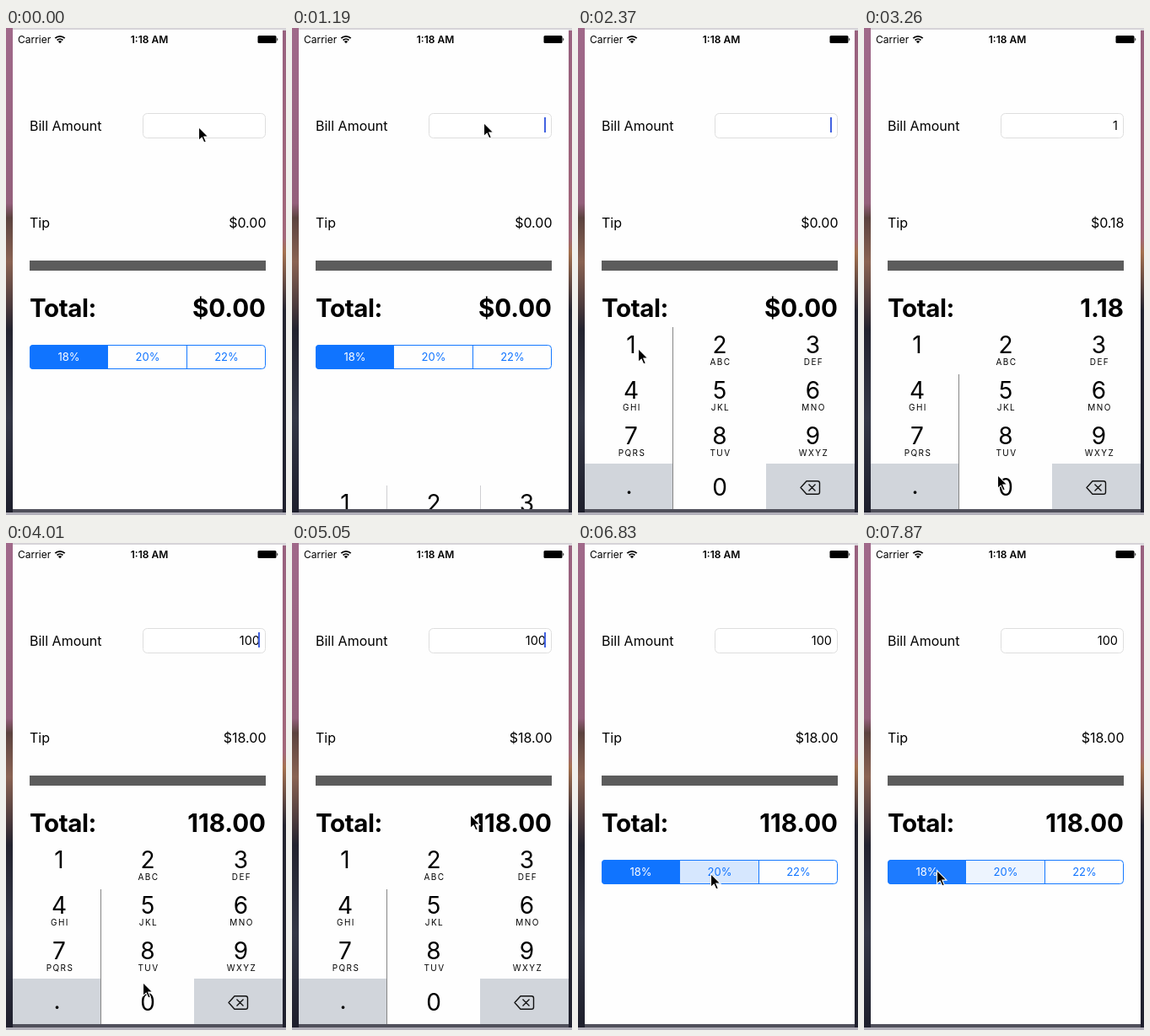
An HTML page that plays this animation: 332 px wide and 578 px high, repeating every 8000 ms.

```html
<!DOCTYPE html>
<html lang="en">
<head>
<meta charset="utf-8">
<title>Tip calculator</title>
<style>
html, body { margin: 0; width: 100%; height: 100%; overflow: hidden; }
svg { display: block; width: 332px; height: 578px; font: 16px Inter, Roboto, sans-serif; }
.end { text-anchor: end; }
.mid { text-anchor: middle; }
.big { font-size: 29.5px; font-weight: 700; }
.seg { font-size: 13px; }
.key { font-size: 28px; }
.abc { font-size: 10px; letter-spacing: 1.4px; }
</style>
</head>
<body>
<svg viewBox="0 0 332 578">
  <defs>
    <linearGradient id="left" x2="0" y2="1">
      <stop offset="0" stop-color="#a0698a"/><stop offset=".36" stop-color="#94607c"/>
      <stop offset=".39" stop-color="#5c433f"/><stop offset=".48" stop-color="#8a6353"/>
      <stop offset=".57" stop-color="#4c3b3d"/><stop offset=".62" stop-color="#23232f"/>
      <stop offset=".8" stop-color="#343746"/><stop offset="1" stop-color="#1d1e2b"/>
    </linearGradient>
    <linearGradient id="right" x2="0" y2="1">
      <stop offset="0" stop-color="#98617f"/><stop offset=".43" stop-color="#a3677a"/>
      <stop offset=".46" stop-color="#a5714f"/><stop offset=".53" stop-color="#5b4440"/>
      <stop offset=".58" stop-color="#23232f"/><stop offset="1" stop-color="#20212e"/>
    </linearGradient>
    <clipPath id="screen"><path d="M8 3H328V571H8Z"/></clipPath>
    <clipPath id="pill"><rect x="28" y="376" width="280" height="29" rx="4"/></clipPath>
  </defs>
  <path fill="url(#left)" d="M0 0H8V578H0Z"/>
  <path fill="url(#right)" d="M328 0H332V578H328Z"/>
  <path fill="#50505b" d="M8 571H328V575H8Z"/>
  <path fill="#b2b0ba" d="M0 575H332V578H0Z"/>
  <path fill="#d6d3d8" d="M8 0H332V3H8Z"/>
  <path fill="#fefefe" d="M8 2H328V571H8Z"/>

  <text x="14" y="17.5" font-size="12">Carrier</text>
  <text x="170" y="17.5" font-size="12" font-weight="600" class="mid">1:18 AM</text>
  <g fill="none" stroke="#000" stroke-width="1.8">
    <path d="M58.3 12.2A8.2 8.2 0 0 1 69.7 12.2M60.6 14.5A5 5 0 0 1 67.4 14.5"/>
    <path fill="#000" stroke="none" d="M64 18.3L61.9 16.1A3 3 0 0 1 66.1 16.1Z"/>
  </g>
  <rect x="298.5" y="9" width="22" height="9" rx="1.5"/>
  <path d="M321.3 11.5Q323.3 13.5 321.3 15.5Z"/>

  <text x="28" y="121.5">Bill Amount</text>
  <rect x="162.5" y="101.5" width="145" height="29" rx="5" fill="#fff" stroke="#dedede"/>
  <text id="bill" class="end" x="301" y="121" font-size="14.5"/>
  <path id="caret" fill="#4262e0" d="M299 106H301V124H299Z"/>
  <text x="28" y="237.3">Tip</text>
  <text id="tip" class="end" x="308.5" y="237.3"/>
  <path fill="#5c5c5c" d="M28 276H308V288H28Z"/>
  <text class="big" x="28" y="342.5" letter-spacing="-.4">Total:</text>
  <text id="total" class="big end" x="308" y="342.5"/>

  <g id="segs" clip-path="url(#pill)"></g>
  <g fill="none" stroke="#1478ff">
    <rect x="28.5" y="376.5" width="279" height="28" rx="4"/>
    <path d="M120.5 376V405M214.5 376V405"/>
  </g>
  <g clip-path="url(#screen)"><g id="pad"></g></g>
  <path id="arrow" stroke="#fff" stroke-width="1.1" d="M0 0V16L3.7 12.6 6.3 18.4 8.8 17.3 6.3 11.6H11.4Z"/>
</svg>
<script>
const $ = id => document.getElementById(id);
const LOOP = 8000, STEP = 148.4, BLUE = '#1074ff', GREY = '#d1d5db';
const PAD_HEIGHT = 216, ROW = 54, TOP = 355;

// Tracks are lists of [time, value, ...].
const cursor = [[0, 228, 117], [450, 228, 116], [1040, 227, 112], [1640, 227, 112], [2220, 85, 366],
  [2370, 71, 380], [2820, 71, 382], [3260, 158, 530], [3860, 146, 531], [4010, 162, 521],
  [4460, 212, 384], [4900, 212, 384], [5050, 211, 320], [5200, 210, 258], [5340, 210, 229],
  [5790, 210, 229], [6530, 159, 388], [6830, 157, 392], [7130, 157, 392], [7570, 87, 389], [7870, 86, 388]];
const slide = [[1040, 216], [1190, 187], [1340, 62], [1490, 12], [1640, 0],
  [5490, 0], [5640, 24], [5790, 139], [5940, 192], [6090, 210], [6240, 216]];
const fills = [
  [[6830, 1], [6980, 0], [7420, 0], [7570, .17], [7720, .55], [7870, .96]],
  [[6680, 0], [6830, .17], [6980, 1], [7570, 1], [7720, .45], [7870, .06]],
  [[0, 0]]];

function at(track, t) {
  const i = track.findIndex(k => k[0] > t);
  if (i <= 0) return track.at(i).slice(1);
  const a = track[i - 1], b = track[i], f = (t - a[0]) / (b[0] - a[0]);
  return a.slice(1).map((v, j) => v + (b[j + 1] - v) * f);
}
const within = (t, ...spans) => spans.some(([a, b]) => t >= a && t < b);

$('segs').innerHTML = ['18%', '20%', '22%'].map((s, i) =>
  `<rect x="${[28, 121, 215][i]}" y="376" width="93" height="29" fill="${BLUE}"/>
   <text class="seg mid" x="${[74.5, 168, 261.5][i]}" y="395.3">${s}</text>`).join('');
const segs = [...$('segs').querySelectorAll('rect')];

const letters = ',ABC,DEF,GHI,JKL,MNO,PQRS,TUV,WXYZ'.split(',');
const keyX = [63, 168, 278.5];
const digits = letters.map((s, i) => {
  const x = keyX[i % 3], y = 385.5 + ROW * Math.floor(i / 3);
  return `<text class="key mid" x="${x}" y="${y}">${i + 1}</text>
    <text class="abc mid" x="${x + 1}" y="${y + 14.7}">${s}</text>`;
}).join('');
$('pad').innerHTML = `
  <path fill="#fefefe" d="M8 ${TOP}H328V571H8Z"/>
  <path fill="${GREY}" d="M8 517H112V571H8ZM223 517H328V571H223Z"/>
  <path id="one" fill="${GREY}" d="M8 355H112V409H8Z"/>
  <path id="zero" fill="${GREY}" d="M113 517H223V571H113Z"/>
  <path id="lines" fill="none"/>
  ${digits}
  <text class="key mid" x="168" y="554.5">0</text>
  <text class="key mid" x="60.5" y="553">.</text>
  <path fill="none" stroke="#111" stroke-width="1.4" stroke-linejoin="round"
    d="M264 545.5L271 537.7H284Q286.5 537.7 286.5 540V551Q286.5 553.3 284 553.3H271ZM273.5 541.5L281.5 549.5M281.5 541.5L273.5 549.5"/>`;

function draw(t) {
  const bill = t < 2660 ? 0 : t < 3400 ? 1 : t < 3700 ? 10 : 100;
  const rate = within(t, [6970, 7710]) ? .2 : .18;
  $('bill').textContent = bill || '';
  $('tip').textContent = '$' + (bill * rate).toFixed(2);
  $('total').textContent = (bill ? '' : '$') + (bill * (1 + rate)).toFixed(2);

  const caretOn = within(t, [1030, 1630], [2080, 3250], [3400, 4300], [4750, 5330]);
  $('caret').style.opacity = +caretOn;

  const [drop] = at(slide, t), still = drop === 0;
  $('pad').setAttribute('transform', `translate(0 ${Math.round(drop)})`);
  $('pad').style.display = drop < PAD_HEIGHT ? '' : 'none';
  const pressed = within(t, [2510, 2660]);
  $('one').style.opacity = +pressed;
  $('zero').style.opacity = +within(t, [3400, 3550], [3700, 3850]);
  const start = still && t > 2510 ? 411 : TOP;
  $('lines').setAttribute('d', `M112.5 ${start}V571` + (still ? '' : `M223.5 ${TOP}V571`));
  $('lines').setAttribute('stroke', still ? '#858585' : '#cfcfd2');

  segs.forEach((seg, i) => {
    const [fill] = at(fills[i], t);
    seg.style.opacity = fill;
    seg.nextElementSibling.style.fill = fill > .5 ? '#fff' : BLUE;
  });
  const [x, y] = at(cursor, t).map(Math.round);
  $('arrow').setAttribute('transform', `translate(${x + .5} ${y + .5})`);
}

function tick() {
  const t = performance.now() % LOOP;
  draw(Math.floor((t + 5) / STEP) * STEP);
  requestAnimationFrame(tick);
}
tick();
</script>
</body>
</html>
```
